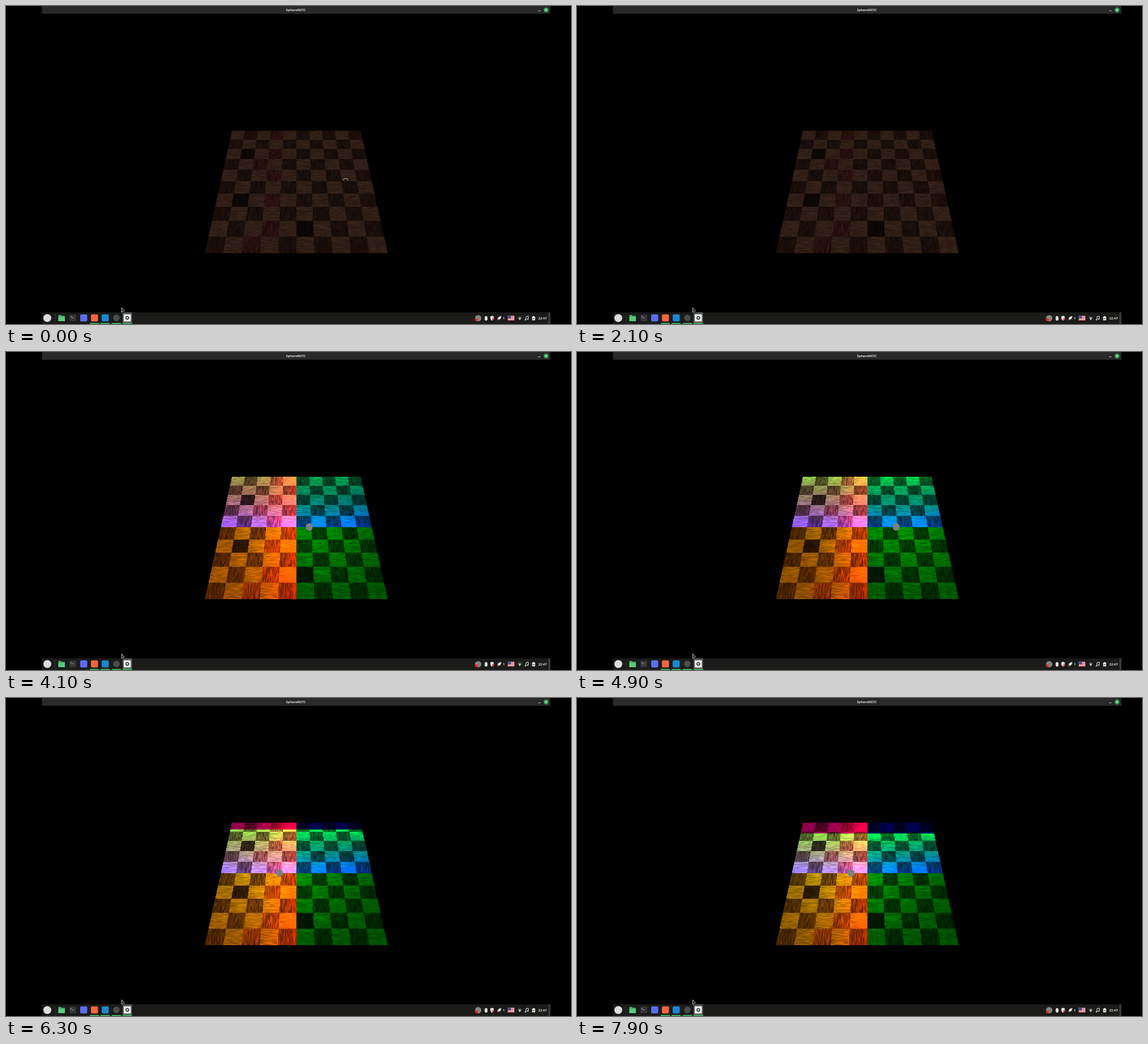
Animation of 998 by 561 pixels, one loop 8 s. Source, as an HTML page with a canvas:

```html
<!DOCTYPE html>
<html lang="en">
<head>
<meta charset="utf-8">
<title>Lit board</title>
<style>
  html, body { margin: 0; width: 100%; height: 100%; overflow: hidden; background: #000; }
  canvas, svg { position: absolute; left: 0; top: 0; }
  text { font: bold 5.8px "Open Sans", sans-serif; fill: #e2e2e2; }
</style>
</head>
<body>
<canvas width="998" height="561"></canvas>
<svg width="998" height="561" viewBox="0 0 998 561">
  <!-- title bar -->
  <rect x="63.5" width="898" height="13.7" fill="#292929"/>
  <text x="512" y="9.2" text-anchor="middle">SphereNSTC</text>
  <path d="M940 8.5h4" stroke="#bbb"/>
  <circle cx="954" cy="7" r="4.2" fill="#35a85b"/>
  <path d="M952.5 5.5l3 3m0-3l-3 3" stroke="#fff" stroke-width=".9"/>

  <!-- task bar -->
  <rect x="63.5" y="540.5" width="898" height="20.5" fill="#1b1b1a"/>
  <rect x="958" y="540.5" width="3.5" height="20.5" fill="#3a3a3a"/>
  <path d="M86.5 543v16" stroke="#333"/>
  <circle cx="73" cy="550.5" r="7" fill="#dcdcdc"/>
  <path d="M92.5 545h4.5l1.5 1.5h5.5v9.5h-11.5z" fill="#3fae63"/>
  <path d="M92.5 548.5h11.5v7.5h-11.5z" fill="#56cd7d"/>
  <rect x="112" y="544.5" width="12" height="11.5" rx="1.5" fill="#343638"/>
  <path d="M114 547l1.5 1.3-1.5 1.3M116.5 550h2.5" fill="none" stroke="#ddd" stroke-width=".8"/>
  <rect x="131" y="544" width="12.5" height="12.5" rx="2.5" fill="#5c6cf0"/>
  <rect x="150" y="544" width="12.5" height="12.5" rx="2.5" fill="#f2653c"/>
  <rect x="169" y="544" width="12.5" height="12.5" rx="2.5" fill="#1c86d0"/>
  <circle cx="195" cy="550.2" r="5.8" fill="#4a4d4c"/>
  <rect x="206" y="540.5" width="16.5" height="20.5" fill="#5a5d5b"/>
  <rect x="208" y="544" width="12.5" height="12.5" rx="1" fill="#f2f2f2"/>
  <circle cx="214.2" cy="550.2" r="2.2" fill="none" stroke="#35404c" stroke-width="1.6"/>
  <circle cx="214.2" cy="550.2" r="3.4" fill="none" stroke="#35404c" stroke-dasharray="1.34 1.33"/>
  <path d="M148 560h16m3 0h16m4 0h16m3 0h16.5" stroke="#35a85b" stroke-width="2"/>

  <!-- tray -->
  <circle cx="834" cy="550.8" r="5.6" fill="#858585"/>
  <circle cx="831" cy="553.5" r="2.6" fill="#e02727"/>
  <rect x="845.5" y="547" width="5" height="8" rx="2.5" fill="#e0e0e0"/>
  <path d="M855.5 547.5l3-1 3 1v4q-1 2.5-3 3.5-2-1-3-3.5z" fill="#e0e0e0"/>
  <circle cx="860.5" cy="552.5" r="1.7" fill="#e23b3b"/>
  <path d="M868 551l3-3 4-1-1 4-3 3 0-2-3 3 1-3z" fill="#e6e6e6"/>
  <text x="877.5" y="553">1</text>
  <rect x="886.5" y="546.5" width="11.5" height="8.5" fill="#eee"/>
  <path d="M886.5 547.2h11.5m-11.5 2.4h11.5m-11.5 2.4h11.5m-11.5 2.4h11.5" stroke="#cf3a45" stroke-width="1.2"/>
  <rect x="886.5" y="546.5" width="5.5" height="4.5" fill="#41508f"/>
  <path d="M904 549.5q3.5-3 7 0l-3.5 4.5z" fill="#777"/>
  <path d="M905.5 551.5q2-1.5 4 0l-2 2.5z" fill="#ddd"/>
  <path d="M918.5 553.5v-5.5l4-1v5.5" fill="none" stroke="#e6e6e6"/>
  <path d="M916.5 553.5h2m2-1h2" stroke="#e6e6e6" stroke-width="2"/>
  <path d="M930.8 547h2.4v1h1.5v6.5h-5.4V548h1.5z" fill="#e6e6e6"/>
  <path d="M930.5 551.5h3" stroke="#333"/>
  <text x="940.3" y="552.8">22:47</text>

  <path d="M204.5 532.5v8l2-1.8 2.7-.9z" fill="#000" stroke="#e4e4e4" stroke-width=".9"/>
</svg>
<script>
const ctx = document.querySelector('canvas').getContext('2d');
const LEFT = 349, TOP = 217, W = 328, H = 221;
const image = ctx.createImageData(W, H);
const LIGHTS_ON = 2700, CRESCENT_END = 1000, CENTER = 512.8;

// time, ball x, edge of the green light (board rows), red strength
const keys = [
  [2700, 507, -2.6, 1], [3300, 507, -2.5, 1], [4900, 564, -0.4, 0.85],
  [5800, 482, -0.4, 0.9], [7000, 484.5, 2.39, 0.8], [7900, 484, 1.2, 0.8]
];
const redTiles = ['0,3', '6,3', '8,3', '9,2', '4,3', '2,3', '3,2'];
const blackTiles = ['6,1', '8,5', '2,1'];

const hash = (x, y) => {
  const s = Math.sin(x * 127.1 + y * 311.7) * 43758.5453;
  return s - Math.floor(s);
};
const mix = (a, b, k) => a + (b - a) * k;

function noise(x, y) {
  const i = Math.floor(x), j = Math.floor(y), f = x - i, g = y - j;
  return mix(mix(hash(i, j), hash(i + 1, j), f), mix(hash(i, j + 1), hash(i + 1, j + 1), f), g);
}

// Wood colour at a board position, one factor per channel
function wood(u, v) {
  const col = Math.floor(u), row = Math.floor(v), tile = row + ',' + col;
  const seed = 40 * hash(col + 3, row + 7);
  if ((row + col) % 2 === 0) {
    const g = 0.7 + 0.5 * noise(u * 4 + seed, v * 26 + 0.3 * Math.sin(u * 8 + seed));
    return [g, g, g];
  }
  const n = noise(u * 26 + 0.3 * Math.sin(v * 8 + seed), v * 4 + seed);
  const g = (0.55 + 0.9 * n) * (blackTiles.includes(tile) ? 0.5 : 1);
  return redTiles.includes(tile) ? [g * 0.75, g * 0.5, g * 0.55] : [g * 0.5, g * 0.42, g * 0.42];
}

const pixels = [];
for (let y = 0; y < H; y++) {
  for (let x = 0; x < W; x++) {
    const depth = y + TOP + 0.5 + 291;
    const u = ((x + LEFT + 0.5 - CENTER) / (depth * 0.2222) + 1) * 5;
    const v = (1 / 511 - 1 / depth) / (1 / 511 - 1 / 727) * 10;
    if (u >= 0 && u < 10 && v >= 0 && v < 10) pixels.push({ at: 4 * (y * W + x), u, v, tex: wood(u, v) });
  }
}
for (const p of pixels) {
  p.red = p.u < 5 ? 225 + 300 * Math.exp(p.u - 5) : 0;
  p.blue = p.v < 5 ? 70 + 260 * Math.exp((p.v - 5) / 1.4) : 0;
}

function stateAt(t) {
  let i = 0;
  while (i < keys.length - 2 && t > keys[i + 1][0]) i++;
  const a = keys[i], b = keys[i + 1];
  const k = Math.min(1, (t - a[0]) / (b[0] - a[0]));
  return a.map((value, n) => mix(value, b[n], k));
}

function drawBoard(lit, ballX, edge, strength) {
  const data = image.data, ballU = 5 + (ballX - CENTER) / 26.7;
  for (const { at, u, v, tex, red, blue } of pixels) {
    const near = Math.exp(-((u - ballU) ** 2 + (v - 5) ** 2) / 18);
    const green = v > edge ? 78 + 60 * near + 165 * Math.exp((edge - v) / 2) : 0;
    data[at] = tex[0] * (lit ? red * strength * (0.75 + 0.3 * near) : 50);
    data[at + 1] = tex[1] * (lit ? green : 31);
    data[at + 2] = tex[2] * (lit ? blue : 23);
    data[at + 3] = 255;
  }
  ctx.putImageData(image, LEFT, TOP);
}

function drawBall(x) {
  ctx.beginPath();
  for (let i = 0; i < 8; i++) {
    const a = (i + 0.5) * Math.PI / 4;
    ctx.lineTo(x + 6.4 * Math.cos(a), 308.6 + 7 * Math.sin(a));
  }
  ctx.fillStyle = '#7b7f80';
  ctx.fill();
}

function drawCrescent() {
  ctx.beginPath();
  ctx.ellipse(600, 307.5, 4, 3.2, 0, Math.PI, 2 * Math.PI);
  ctx.strokeStyle = '#8d8988';
  ctx.lineWidth = 1.5;
  ctx.stroke();
}

function frame() {
  const t = performance.now() % 8000, lit = t >= LIGHTS_ON;
  const [, ballX, edge, strength] = stateAt(Math.max(t, LIGHTS_ON));
  drawBoard(lit, ballX, edge, strength);
  if (lit) drawBall(ballX);
  else if (t < CRESCENT_END) drawCrescent();
  requestAnimationFrame(frame);
}
frame();
</script>
</body>
</html>
```
